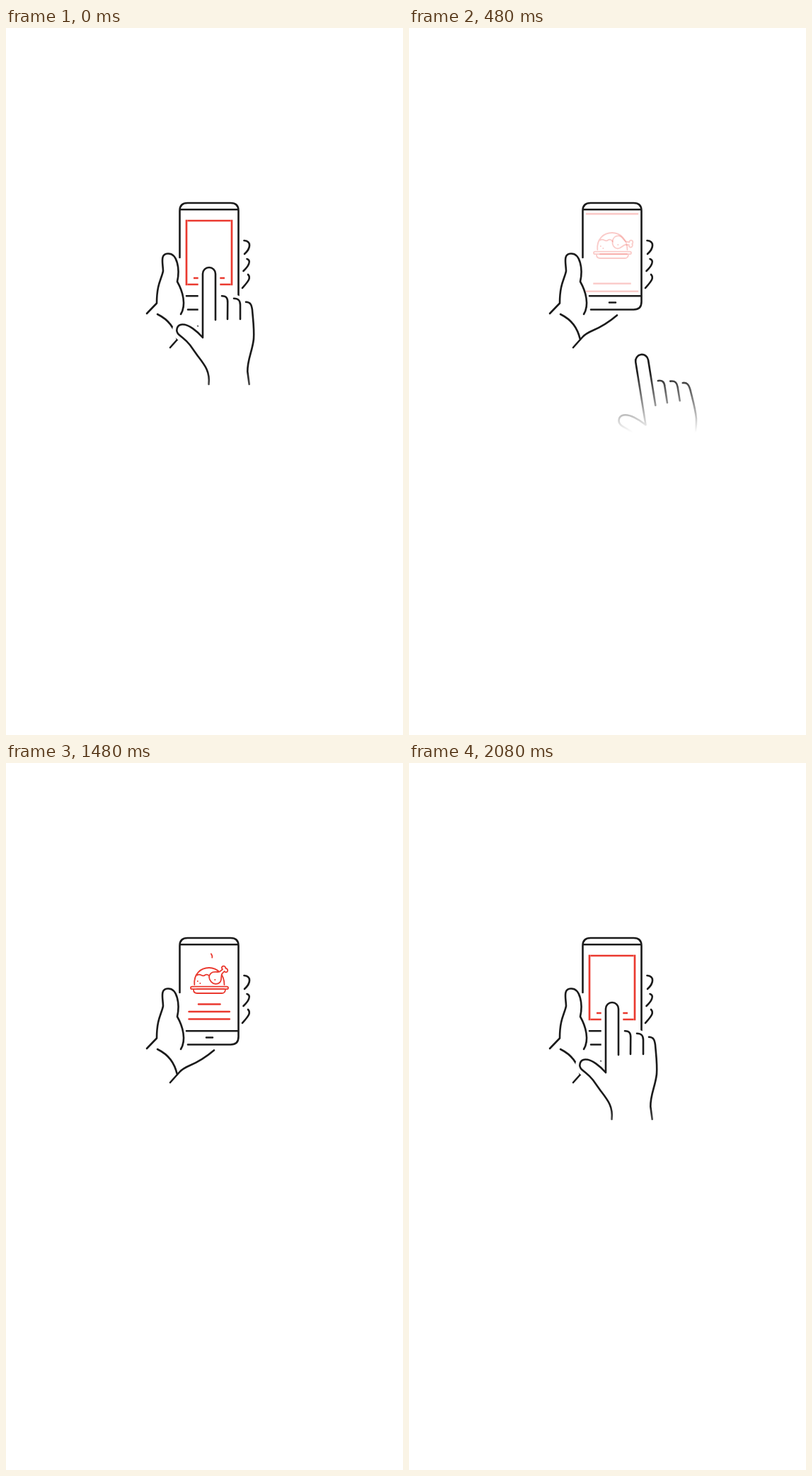
Write an HTML page with a canvas that moves like this. It is 561 by 998 pixels and loops after 2100 ms.

```html
<!DOCTYPE html>
<html lang="en">
<head>
<meta charset="utf-8">
<title>Ordering by phone</title>
<style>
html, body { margin: 0; width: 100%; height: 100%; overflow: hidden; background: #fff; }
canvas { display: block; }
</style>
</head>
<body>
<canvas id="stage" width="561" height="998"></canvas>
<script>
const ctx = document.getElementById('stage').getContext('2d');
const LOOP = 2100, INK = '#1b1b1b', RED = '#ea392f';
const P = d => new Path2D(d);

const phone = P('M245.5 324V258Q245.5 247 256.5 247H317.5Q328.5 247 328.5 258V386.5Q328.5 397.5 317.5 397.5H257' +
  'M246 256.3H328M255 378.3H328M283 387.5H292');

const holder = P('M247 404C255 391 250 372 242 358C246 340 242 318 229 318.5C217 318 222 334 222 343C220 354 213 361 213 388.5L199 403' +
  'M214 404C230 412 238 423 242 440' +
  'M232 451L245 436.5C255 425 265 430 294 405.5' +
  'M336.5 300C347 301 346 311 337 319' +
  'M340.5 326C347 328 343 336 335.5 343' +
  'M342 348C347 353 341 359 334 367');

// Pointing hand, relative to its resting place
const thumb = '286.5 503C288.5 485 281 476 271 463L260 447.5C254 440 250 438 244.5 433C239 428 241 419 249 418.5C258 418 270 428 278 437';
const finger = 'V347A9 9 0 0 1 296 347';
const side = 'C345 387 347 390 348 398C349 411 351 425 350 439C348 457 341 468 341.3 485L343.7 503';
const hand = P('M' + thumb + finger + 'V412' +
  'M305 378.3C312 378.3 313.5 382 313.2 388L313 411' +
  'M322 381.7C329 381.7 331 385 331 391V411' +
  'M339 386.8' + side);
const handShape = P('M' + thumb + finger + 'V378L305 378.3L313 381.5L322 381.7L330 385.5L339 386.8' + side + 'Z');

const bird = P('M266.3 313C265 298 275 289 287 289C298 289 308.5 298 308.5 313' +
  'M270 299.5C275 296 277 303 281 299.5C284 297.5 286 299 288 301.5');
const plate = P('M263 315.6H312Q314 315.6 314 317.4Q314 319.2 312 319.2H263Q261 319.2 261 317.4Q261 315.6 263 315.6Z' +
  'M265 320Q265 325 270 325H305Q309.5 325 310 320');
// Drumstick lies along +x from the middle of the meat
const drumstick = P('M9.5 -2.2C6 -3 4 -9 -1 -9C-6.5 -9 -9.2 -5 -9.2 0C-9.2 5 -6 9 -1 9C4 9 6 3 9.5 2.2' +
  'L14.5 1.9C14 6 20 6.3 19.5 1.4C19.4 .7 19 .3 18.6 0C19 -.3 19.4 -.7 19.5 -1.4C20 -6.3 14 -6 14.5 -1.9Z');

const clamp = u => Math.min(1, Math.max(0, u));
const ramp = (t, from, to) => clamp((t - from) / (to - from));
const ease = (t, from, to) => { const u = ramp(t, from, to); return u * u * (3 - 2 * u); };

function stroke(path, color, width) {
  ctx.strokeStyle = color;
  ctx.lineWidth = width;
  ctx.stroke(path);
}

function line(x1, y1, x2, y2, width) {
  ctx.lineWidth = width;
  ctx.beginPath();
  ctx.moveTo(x1, y1);
  ctx.lineTo(x2, y2);
  ctx.stroke();
}

function drawFrame(t) {
  const back = ramp(t, 1760, 2070);
  const grow = t < 1700 ? ease(t, 0, 480) : 0;
  const alpha = t < 1700 ? 1 - ramp(t, 190, 580) : back;
  const sides = t < 1700 ? 1 - ramp(t, 0, 350) : back;
  if (alpha <= 0) return;
  ctx.save();
  ctx.translate(287, 317);
  const s = 1 + 0.215 * grow;
  ctx.strokeStyle = RED;
  ctx.lineCap = 'butt';
  ctx.globalAlpha = alpha;
  for (const y of [-45, 45]) line(-30.6 * s, y * s, 30.6 * s, y * s, 2.6);
  line(-22 * s, 36 * s, 22 * s, 36 * s, 2.6);
  ctx.globalAlpha = sides;
  for (const x of [-32, 32]) line(x * s, -46.3 * s, x * s, 46.3 * s, 2.7);
  ctx.restore();
}

function drawSteam(t, x, y, start) {
  for (const t0 of [start, start + 816]) {
    const head = ramp(t, t0, t0 + 240);
    const tail = ramp(t, t0 + 220, t0 + 670);
    if (head <= 0.04 || tail >= 0.97) continue;
    ctx.beginPath();
    for (let i = 0; i <= 16; i++) {
      const u = tail + (head - tail) * i / 16;
      ctx.lineTo(x + 1.2 * Math.sin(u * 6.3 + 3.4), y - 14 * u);
    }
    ctx.lineWidth = 1.8;
    ctx.stroke();
  }
}

function drawDish(t) {
  const show = 1 - ramp(t, 1760, 2060);
  if (t < 400 || show <= 0) return;
  ctx.save();
  ctx.strokeStyle = ctx.fillStyle = RED;

  ctx.globalAlpha = show * ease(t, 420, 600);
  stroke(bird, RED, 1.8);
  stroke(plate, RED, 1.8);
  line(270, 319.2, 308, 319.2, 1.8);
  for (const [x, y] of [[270.8, 308], [274.4, 311]]) {
    ctx.beginPath();
    ctx.arc(x, y, 1, 0, 7);
    ctx.fill();
  }

  ctx.save();
  ctx.translate(296.7, 302.5);
  ctx.rotate((-43 + 50 * (1 - ease(t, 480, 780))) * Math.PI / 180);
  ctx.fillStyle = '#fff';
  ctx.fill(drumstick);
  stroke(drumstick, RED, 1.8);
  ctx.restore();
  ctx.beginPath();
  ctx.arc(295.3, 306, 1, 0, 7);
  ctx.fill();

  ctx.globalAlpha = show;
  drawSteam(t, 284.2, 282.8, 820);
  drawSteam(t, 290.2, 283.4, 980);

  const rows = [[272, 302.5, 340.6, 560, 780], [258.5, 315.8, 351, 780, 1060], [258.5, 315.8, 361.4, 1065, 1345]];
  for (const [x1, x2, y, from, to] of rows) {
    const u = ease(t, from, to);
    if (u > 0) line(x1, y, x1 + (x2 - x1) * u, y, 2.5);
  }
  ctx.restore();
}

function drawHand(t) {
  const leaving = t < 1100;
  const away = leaving ? ease(t, 133, 693) : 1 - ease(t, 1520, 2080);
  const tilt = leaving ? ease(t, 60, 620) : away;
  const alpha = leaving ? 1 - ramp(t, 540, 668) : ramp(t, 1520, 1640);
  if (alpha <= 0) return;
  ctx.save();
  ctx.globalAlpha = alpha;
  ctx.translate(287 + 60.2 * away, 338 + 182 * away);
  ctx.rotate(-10.8 * tilt * Math.PI / 180);
  ctx.translate(-287, -338);
  ctx.fillStyle = '#fff';
  ctx.fill(handShape);
  stroke(handShape, '#fff', 12.6);
  stroke(hand, INK, 2.6);
  ctx.restore();

  // The wrist dissolves towards the bottom
  const fade = ctx.createLinearGradient(0, 485, 0, 571);
  fade.addColorStop(0, 'rgba(255,255,255,0)');
  fade.addColorStop(1, '#fff');
  ctx.fillStyle = fade;
  ctx.fillRect(0, 485, 561, 513);
}

function draw(t) {
  ctx.fillStyle = '#fff';
  ctx.fillRect(0, 0, 561, 998);
  ctx.lineCap = ctx.lineJoin = 'round';
  stroke(phone, INK, 2.6);
  stroke(holder, INK, 2.6);
  drawFrame(t);
  drawDish(t);
  drawHand(t);
}

let begin;
function tick(now) {
  begin ??= now;
  draw((now - begin) % LOOP);
  requestAnimationFrame(tick);
}
draw(0);
requestAnimationFrame(tick);
</script>
</body>
</html>
```
